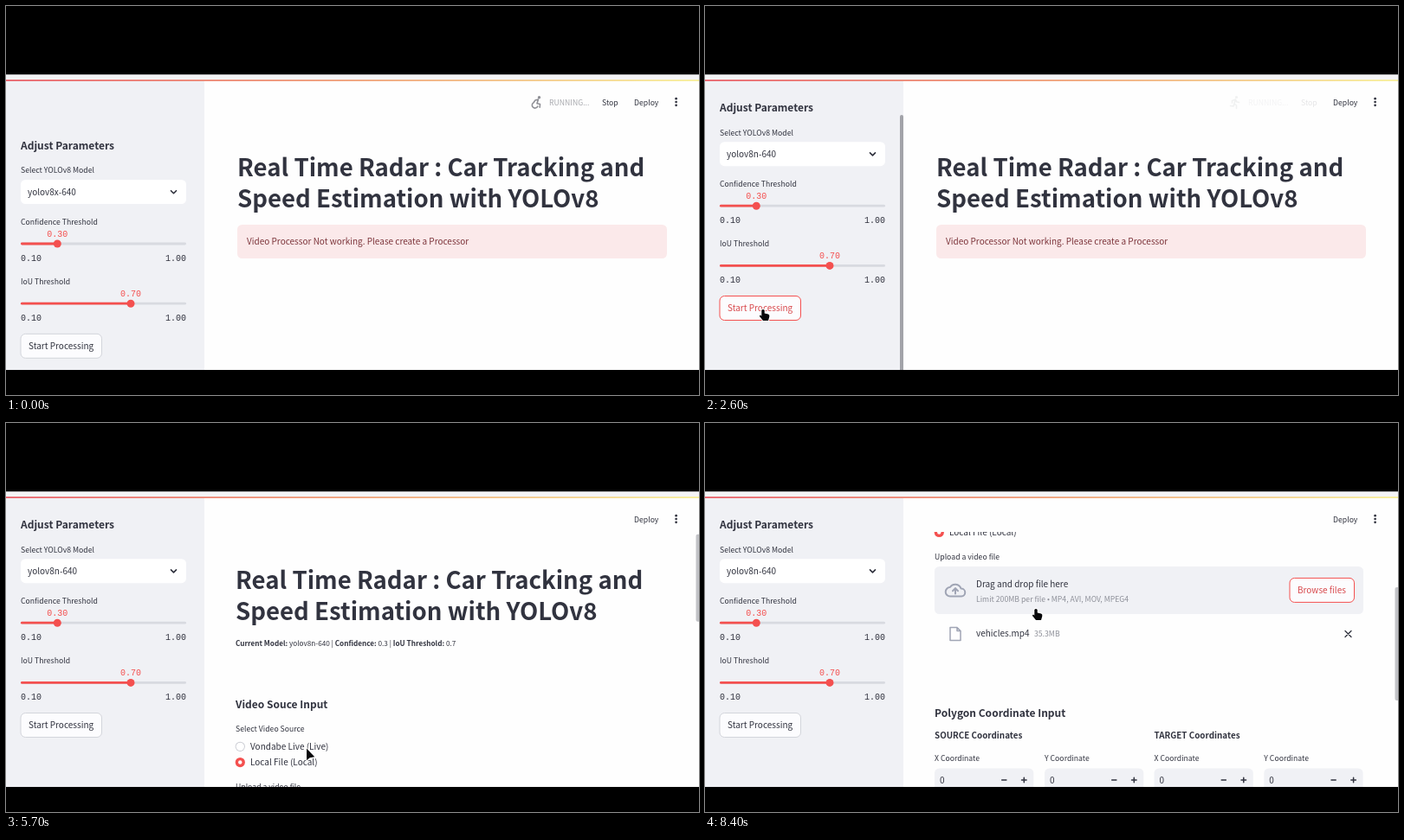
These frames come from a looping animation (800x450 px, 8.5 s). An HTML page with a canvas:

```html
<!DOCTYPE html>
<html lang="en">
<head>
<meta charset="utf-8">
<title>Radar dashboard</title>
<style>
  html, body { margin: 0; width: 100%; height: 100%; overflow: hidden; background: #000; }
  canvas { display: block; width: 800px; height: 450px; }
</style>
</head>
<body>
<canvas id="stage"></canvas>
<script>
const LOOP = 8500;
const SANS = '"Noto Sans CJK JP", "Noto Sans CJK SC", "Noto Sans CJK", "Noto Sans", sans-serif';
const MONO = '"Liberation Mono", monospace';
const INK = '#31333f', RED = '#f4504f', PANEL = '#f0f1f5', GREY = '#8d8f98', PAGE = '#fefefe';
const TITLE = 27.6, HEADING = 12, BODY = 10, LABEL = 8.7, SMALL = 8.2;

const canvas = document.getElementById('stage');
const ctx = canvas.getContext('2d');
const dpr = window.devicePixelRatio || 1;
canvas.width = 800 * dpr;
canvas.height = 450 * dpr;

const clamp = v => Math.max(0, Math.min(1, v));
const ramp = (t, from, to) => clamp((t - from) / (to - from));
const ease = p => p * p * (3 - 2 * p);
const lerp = (a, b, p) => a + (b - a) * p;
const during = (t, from, to) => t >= from && t < to;

// Pointer hotspot: time, x, y
const pointerPath = [
  [300, 226, 300], [750, 120, 212], [1050, 120, 212], [1500, 59, 293],
  [1700, 58, 240], [1900, 58, 240], [2350, 69, 345], [2600, 67, 351],
  [3500, 67, 351], [4400, 255, 290], [4800, 307, 273], [5200, 300, 393],
  [5500, 300, 393], [6100, 480, 330], [6700, 695, 283], [7000, 695, 283],
  [7400, 287, 131], [7650, 287, 131], [8150, 390, 205], [8400, 382, 215]
];
const handTimes = [[700, 3600], [5050, 5600], [8250, 8500]];

function pointerAt(t) {
  let i = pointerPath.findIndex(p => p[0] > t);
  if (i < 0) return pointerPath[pointerPath.length - 1].slice(1);
  const [t0, x0, y0] = pointerPath[i - 1], [t1, x1, y1] = pointerPath[i];
  const p = ease(ramp(t, t0, t1));
  return [lerp(x0, x1, p), lerp(y0, y1, p)];
}

function text(str, x, y, size = BODY, { color = INK, weight = 400, family = SANS, align = 'left' } = {}) {
  ctx.font = `${weight} ${size}px ${family}`;
  ctx.fillStyle = color;
  ctx.textAlign = align;
  ctx.fillText(str, x, y);
  return ctx.measureText(str).width;
}
const bold = (str, x, y, size) => text(str, x, y, size, { weight: 700 });

function box(x, y, w, h, fill, border, radius = 5.5) {
  ctx.beginPath();
  ctx.roundRect(x, y, w, h, radius);
  ctx.fillStyle = fill;
  ctx.fill();
  if (border) {
    ctx.strokeStyle = border;
    ctx.lineWidth = 1;
    ctx.stroke();
  }
}

function dot(x, y, r, color) {
  ctx.beginPath();
  ctx.arc(x, y, r, 0, Math.PI * 2);
  ctx.fillStyle = color;
  ctx.fill();
}

function strokePath(d, x, y, color, width) {
  ctx.save();
  ctx.translate(x, y);
  ctx.strokeStyle = color;
  ctx.lineWidth = width;
  ctx.lineCap = ctx.lineJoin = 'round';
  ctx.stroke(new Path2D(d));
  ctx.restore();
}

function clipped(x, y, w, h, draw) {
  ctx.save();
  ctx.beginPath();
  ctx.rect(x, y, w, h);
  ctx.clip();
  draw();
  ctx.restore();
}

function button(label, x, y, w, active) {
  box(x, y, w, 28, '#fcfcfe', active ? RED : '#d3d5db');
  text(label, x + 9, y + 17.8, BODY, { color: active ? '#d8484c' : INK });
}

function slider(label, value, knobX, y) {
  const mono = { family: MONO };
  text(label, 17, y - 22.5, LABEL);
  text(value, knobX, y - 8.5, 10, { family: MONO, color: RED, align: 'center' });
  box(17, y - 1.4, 191, 2.8, '#d8dae0', null, 1.4);
  box(17, y - 1.4, knobX - 17, 2.8, RED, null, 1.4);
  dot(knobX, y, 4.5, RED);
  text('0.10', 17, y + 19.5, 10, mono);
  text('1.00', 208, y + 19.5, 10, { ...mono, align: 'right' });
}

function dropdown() {
  ctx.save();
  ctx.shadowColor = 'rgba(40,42,60,.32)';
  ctx.shadowBlur = 9 * dpr;
  ctx.shadowOffsetY = 3 * dpr;
  box(17, 229.5, 191, 169, '#fff');
  ctx.restore();
  ctx.fillStyle = '#f3f3f6';
  ctx.fillRect(17, 341.5, 191, 28);
  ['n-640', 'n-1280', 'l-640', 'l-1280', 'x-640', 'x-1280'].forEach((name, i) =>
    text('yolov8' + name, 28, 247 + i * 28.1));
}

function sidebar(t) {
  const open = during(t, 900, 1850);
  ctx.fillStyle = PANEL;
  ctx.fillRect(0, 86, 229, 335);
  if (during(t, 450, 1950)) strokePath('M1.7 -3.5 L-1.7 0 L1.7 3.5', 195, 113.5, '#777983', 1.2);

  ctx.save();
  ctx.translate(0, -43.8 * ease(ramp(t, 1980, 2350)));
  bold('Adjust Parameters', 17, 166, HEADING);
  text('Select YOLOv8 Model', 17, 193.3, LABEL);
  box(17, 201, 191, 28, '#fff', during(t, 850, 2400) ? RED : null);
  text(t < 1850 ? 'yolov8x-640' : 'yolov8n-640', 25, 218.8);
  strokePath('M-3 -1.5 L0 1.5 L3 -1.5', 193.5, 215.2, INK, 1.6);
  slider('Confidence Threshold', '0.30', 59.3, 275);
  slider('IoU Threshold', '0.70', 144, 344.2);
  button('Start Processing', 17, 379.3, 93.5, during(t, 2350, 5300));
  ctx.restore();

  if (open) dropdown();
  const bar = ramp(t, 1980, 2050) * (1 - ramp(t, 2900, 3200));
  if (bar > 0) {
    ctx.globalAlpha = bar;
    box(225, 126, 4, 300, '#a2a3a9', null, 2);
    ctx.globalAlpha = 1;
  }
}

function title(x) {
  bold('Real Time Radar : Car Tracking and', x, 196.7, TITLE);
  bold('Speed Estimation with YOLOv8', x, 233.4, TITLE);
}

function errorPage() {
  title(267);
  box(267, 253, 496, 39, '#fbe9ea');
  text('Video Processor Not working. Please create a Processor', 278, 276, BODY, { color: '#7d353b' });
}

function radio(label, y, chosen) {
  if (chosen) {
    dot(270.3, y, 5.6, RED);
    dot(270.3, y, 2.2, '#fff');
  } else {
    dot(270.3, y, 5.6, '#c9cbd2');
    dot(270.3, y, 4.7, '#fff');
  }
  text(label, 282, y + 3.8);
}

function summary() {
  const parts = ['Current Model:', ' yolov8n-640 | ', 'Confidence:', ' 0.3 | ', 'IoU Threshold:', ' 0.7'];
  parts.reduce((x, part, i) => x + text(part, x, 263, SMALL, { weight: i % 2 ? 400 : 700 }), 265);
}

function uploader(t) {
  text('Upload a video file', 265, 428.8, LABEL);
  box(265, 437, 495, 55, PANEL);
  strokePath('M6.5 -2 A7 7 0 0 0 -6.2 -3.4 A5.2 5.2 0 0 0 -6 7 H7 A4.5 4.5 0 0 0 6.5 -2 Z M0 4 V-2 M-3 .8 L0 -2.4 L3 .8',
    289, 464.5, '#a0a5b5', 2);
  text('Drag and drop file here', 313, 460.5);
  text('Limit 200MB per file • MP4, AVI, MOV, MPEG4', 313, 478, LABEL, { color: GREY });
  button('Browse files', 675, 450.4, 74.5, t >= 6600);
}

function fileRow() {
  strokePath('M-6 -7.5 H2 L6 -3.5 V7.5 H-6 Z M2 -7.5 V-3.5 H6', 289, 515, '#a0a5b5', 1.5);
  const end = 313 + text('vehicles.mp4', 313, 517.8);
  text('35.3MB', end + 5.5, 517.8, LABEL, { color: GREY });
  strokePath('M-3.5 -3.5 L3.5 3.5 M3.5 -3.5 L-3.5 3.5', 742.5, 515, INK, 1.3);
}

function polygonForm() {
  bold('Polygon Coordinate Input', 265, 570.7, HEADING);
  bold('SOURCE Coordinates', 265, 596, 9.85);
  bold('TARGET Coordinates', 518.5, 596, 9.85);
  [265, 392, 518.5, 645.3].forEach((x, i) => {
    text((i % 2 ? 'Y' : 'X') + ' Coordinate', x, 622, LABEL);
    box(x, 630.5, 114.3, 28, PANEL);
    text('0', x + 6, 647.7);
    strokePath('M-2.6 0 H2.6 M20.2 0 H25.8 M23 -2.8 V2.8', x + 80.3, 644, INK, 1.5);
  });
}

function mainPage(t) {
  const first = ease(ramp(t, 5650, 6150)), second = ease(ramp(t, 7950, 8300));
  const hasFile = t >= 7700;
  clipped(229, 126, 571, 295, () => {
    ctx.translate(0, -171 * first - 100 * second);
    title(265);
    summary();
    bold('Video Souce Input', 265, 334.6, HEADING);
    text('Select Video Source', 265, 361.6, LABEL);
    radio('Vondabe Live (Live)', 379.3, t < 5300);
    radio('Local File (Local)', 397.5, t >= 5300);
    uploader(t);
    if (hasFile) {
      fileRow();
      ctx.translate(0, 40);
    }
    polygonForm();
  });
  const top = 128 + 26 * first + 36 * second;
  const height = lerp(100, 138, first) - (hasFile ? 7 : 0);
  box(796.5, top, 5, height, '#c1c2c6', null, 2);
}

function runIcon(seated) {
  const color = '#8f9096';
  if (seated) {
    dot(615.5, 105.8, 1.7, color);
    strokePath('M2 -3.5 L-1.5 -2.5 L-3 -.5 M2 -3.5 L.5 1.2 L4 2 L3.7 5.8 M-3 0 A3.4 3.4 0 1 0 1.3 4.6', 612.5, 111.5, color, 1.6);
  } else {
    dot(613.5, 105.5, 1.6, color);
    strokePath('M.5 -3.5 L-3.5 -2 V.5 M.5 -3.5 L-1 1.5 L1.5 3.5 V7 M-1 1.5 L-2 4.5 L-5.5 4 M.5 -3 L2 -.5 L4.5 0', 612, 111.5, color, 1.6);
  }
}

function header(t) {
  const running = t < 1500 ? 1 - ramp(t, 600, 850) : ramp(t, 2560, 2900) * (1 - ramp(t, 3850, 4050));
  if (running > 0) {
    ctx.globalAlpha = running;
    runIcon(t < 1500);
    text('RUNNING...', 627, 114.5, LABEL, { color: '#a7a8ad' });
    text('Stop', 688, 114.5, LABEL);
    ctx.globalAlpha = 1;
  }
  text('Deploy', 725, 114.5, LABEL);
  [107.2, 111, 114.8].forEach(y => dot(773.6, y, 1.35, INK));
}

function pointer(t) {
  if (t < 300) return;
  const hand = handTimes.some(([from, to]) => during(t, from, to));
  const shape = new Path2D(hand
    ? 'M-1.7 1 Q0 -1 1.7 1 V4.5 L6 5.5 Q7.8 6 7.3 8.5 L6 13 H0 L-4 8 Q-4.2 6.2 -2.6 6.8 L-1.7 7.8 Z'
    : 'M0 0 V13.8 L3.6 10.8 L9.2 9.8 Z');
  ctx.save();
  ctx.translate(...pointerAt(t));
  ctx.lineJoin = 'round';
  ctx.lineWidth = 2;
  ctx.strokeStyle = '#fff';
  ctx.stroke(shape);
  ctx.fillStyle = '#08080a';
  ctx.fill(shape);
  ctx.restore();
}

const rainbow = ctx.createLinearGradient(0, 0, 800, 0);
rainbow.addColorStop(0, '#e8616a');
rainbow.addColorStop(.5, '#f0a078');
rainbow.addColorStop(1, '#f7ef9a');

function draw(t) {
  ctx.setTransform(dpr, 0, 0, dpr, 0, 0);
  ctx.fillStyle = '#000';
  ctx.fillRect(0, 0, 800, 450);
  clipped(0, 79.5, 800, 341.5, () => {
    ctx.fillStyle = PAGE;
    ctx.fillRect(0, 79, 800, 343);
    ctx.fillStyle = '#f4f4f6';
    ctx.fillRect(0, 79, 800, 6.5);
    sidebar(t);
    if (t < 3900) errorPage(); else mainPage(t);
    header(t);
    ctx.fillStyle = rainbow;
    ctx.fillRect(0, 85.2, 800, 1.8);
    pointer(t);
  });
}

const start = performance.now();
function frame() {
  draw((performance.now() - start) % LOOP);
  requestAnimationFrame(frame);
}
frame();
</script>
</body>
</html>
```
